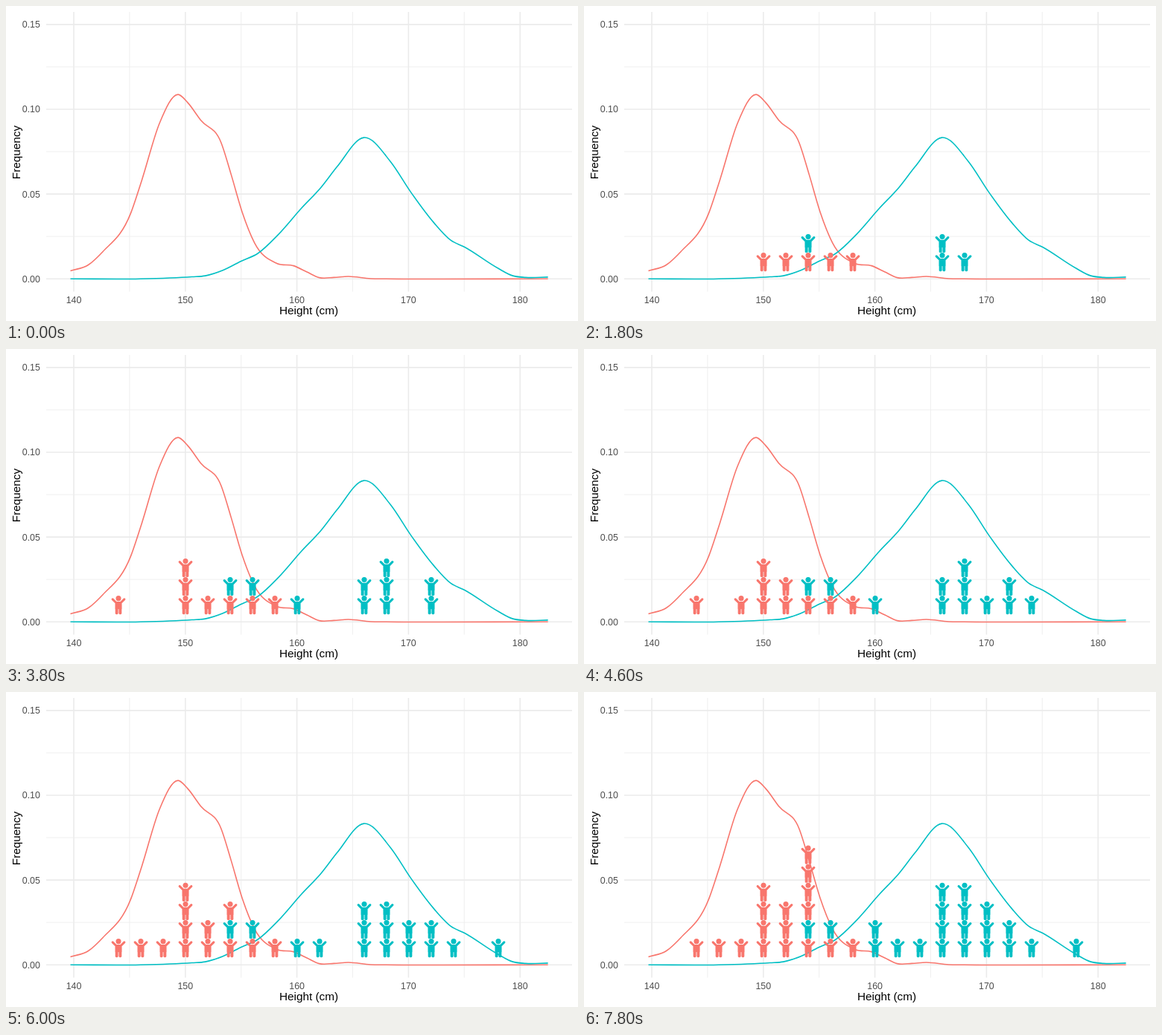
Recreate the animation shown at these times as an HTML page. Size 768 px wide and 424 px high, loop 8000 ms.

```html
<!DOCTYPE html>
<html lang="en">
<head>
<meta charset="utf-8">
<title>Height distributions</title>
<style>
  html, body { margin: 0; width: 100%; height: 100%; overflow: hidden; background: #fff; }
  svg { display: block; width: 768px; height: 424px; }
  text { font-family: "Liberation Sans", Arial, sans-serif; text-anchor: middle; }
  .tick { font-size: 12.4px; fill: #4d4d4d; }
  .title { font-size: 15.3px; fill: #000; }
  .major, .minor { stroke: #ebebeb; stroke-width: 1.6; }
  .minor { stroke-width: .8; }
  .curve { fill: none; stroke-width: 1.6; stroke-linejoin: round; }
</style>
</head>
<body>
<svg viewBox="0 0 768 424">
  <defs>
    <g id="person">
      <circle cx="192" cy="72" r="72"/>
      <path d="M32 96L128 192H256L352 96" fill="none" stroke="currentColor"
            stroke-width="64" stroke-linecap="round" stroke-linejoin="round"/>
      <rect x="104" y="170" width="176" height="198"/>
      <rect x="104" y="200" width="80" height="312" rx="32"/>
      <rect x="200" y="200" width="80" height="312" rx="32"/>
    </g>
  </defs>
  <g id="grid"></g>
  <g id="curves"></g>
  <g id="people"></g>
  <text class="title" x="406.5" y="415">Height (cm)</text>
  <text class="title" transform="translate(19 197) rotate(-90)">Frequency</text>
</svg>
<script>
const LOOP = 8000, STEP = 200, PAUSE_AT = 2400;
const RED = '#f8766d', TEAL = '#00bfc4';
const xOf = height => 91 + (height - 140) * 14.98;
const yOf = frequency => 367.2 - frequency * 2282;

function add(parent, tag, attrs, text = '') {
  const node = document.createElementNS('http://www.w3.org/2000/svg', tag);
  for (const key in attrs) node.setAttribute(key, attrs[key]);
  node.textContent = text;
  return document.getElementById(parent).appendChild(node);
}

// Grid lines and tick labels; odd steps are the minor lines
for (let i = 0; i < 9; i++) {
  const height = 140 + i * 5, x = xOf(height);
  add('grid', 'line', { class: i % 2 ? 'minor' : 'major', x1: x, x2: x, y1: 8, y2: 384.5 });
  if (i % 2 === 0) add('grid', 'text', { class: 'tick', x, y: 400 }, height);
}
for (let i = 0; i < 7; i++) {
  const frequency = i * 0.025, y = yOf(frequency);
  add('grid', 'line', { class: i % 2 ? 'minor' : 'major', x1: 54, x2: 760, y1: y, y2: y });
  if (i % 2 === 0) add('grid', 'text', { class: 'tick', x: 33.8, y: y + 4.4 }, frequency.toFixed(2));
}

// Smooth curve through [height, frequency in thousandths] key points.
// Each tangent is that of the parabola through a point and its neighbours.
function curve(keys, stroke) {
  const points = keys.map(([height, f]) => [xOf(height), yOf(f / 1000)]);
  const last = points.length - 1;
  const width = i => points[i + 1][0] - points[i][0];
  const chord = i => (points[i + 1][1] - points[i][1]) / width(i);
  const slope = i => {
    if (i === 0) return chord(0);
    if (i === last) return chord(last - 1);
    const a = width(i - 1), b = width(i);
    return (b * chord(i - 1) + a * chord(i)) / (a + b);
  };
  let d = 'M' + points[0];
  for (let i = 0; i < last; i++) {
    const [xa, ya] = points[i], [xb, yb] = points[i + 1], h = width(i) / 3;
    d += `C${xa + h} ${ya + h * slope(i)} ${xb - h} ${yb - h * slope(i + 1)} ${xb} ${yb}`;
  }
  add('curves', 'path', { class: 'curve', d, stroke });
}

curve([
  [139.7, 4.7], [141.3, 8.2], [142.6, 16], [145.1, 38.6], [146.1, 58.2], [147.7, 92],
  [149.35, 108.7], [150.2, 104], [151.4, 93.4], [153.2, 80.4], [154.1, 61.6],
  [155.1, 39.2], [156.2, 21.2], [158.2, 9.1], [159.7, 7.7], [160.9, 4], [162, 0.7],
  [163.3, 0.8], [164.6, 1.4], [166.6, 0.1], [168, 0], [182.5, 0]
], RED);
curve([
  [139.7, 0], [146, 0], [150.6, 1.2], [151.8, 1.8], [153.4, 5.1], [155, 10.4],
  [156.5, 15], [158.3, 25.9], [160.4, 41.6], [162.2, 54.2], [163.6, 66.1],
  [166, 83.3], [168.4, 69], [170.2, 51.2], [172.3, 32.9], [173.8, 22.7],
  [175, 18.8], [178, 6.3], [179.3, 1.9], [180.5, 0.8], [182.5, 1]
], TEAL);

// People in order of arrival, each on top of the stack at their height
const arrivals = `r150 t166 r154 t154 r152 t168 r156 t166 r158 t168 t168 t172
  r150 t156 r144 t160 r150 t172 r148 t170 r152 t174 r154 t178 r150
  t162 r146 t166 t170 r152 t164 r154 t160 t170 r154 t166 r154 t168`.split(/\s+/);
const stacks = {};
const people = arrivals.map(arrival => {
  const height = +arrival.slice(1), color = arrival[0] === 'r' ? RED : TEAL;
  const row = stacks[height] = (stacks[height] || 0) + 1;
  const x = Math.ceil(xOf(height)) - 9.4, y = 357.2 - 25.1 * row;
  return add('people', 'use', {
    href: '#person', fill: color, color, transform: `translate(${x} ${y}) scale(.049)`
  });
});

function draw(now) {
  const t = now % LOOP;
  const count = Math.floor(t / STEP) - (t >= PAUSE_AT ? 1 : 0);
  people.forEach((person, i) => { person.style.display = i < count ? '' : 'none'; });
  requestAnimationFrame(draw);
}
draw(performance.now());
</script>
</body>
</html>
```
